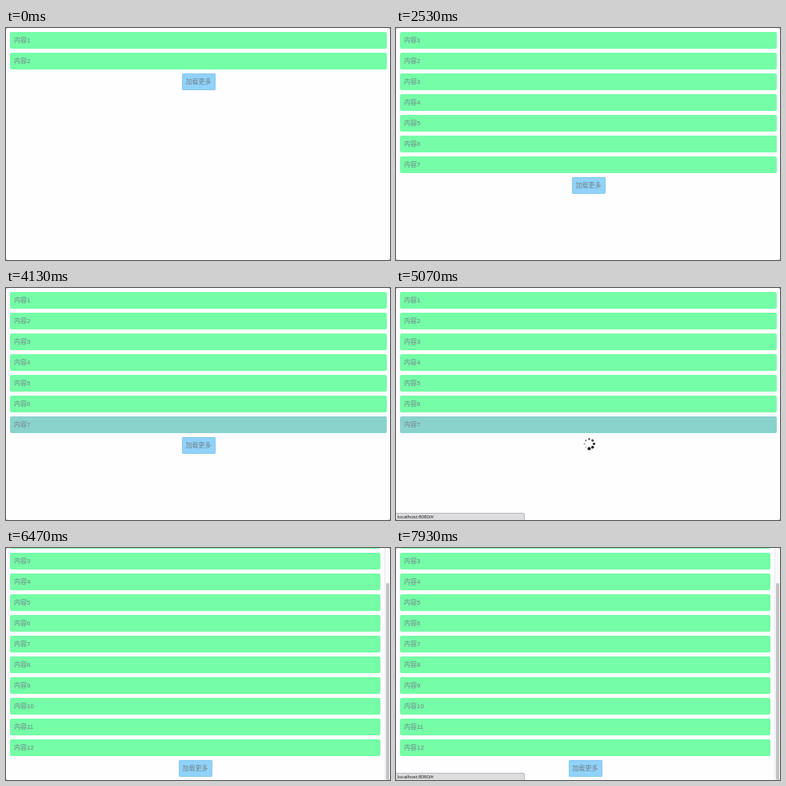
These frames come from a looping animation (480x291 px, 8 s). An HTML page:

```html
<!DOCTYPE html>
<html lang="zh-CN">
<head>
<meta charset="utf-8">
<title>加载更多</title>
<style>
  html, body { margin: 0; width: 100%; height: 100%; overflow: hidden; background: #77757b; }
  #stage {
    position: relative; width: 480px; height: 291px; overflow: hidden;
    background: #fefdff; border-radius: 2px;
    font: 8px/21px "Liberation Sans", "Noto Sans CJK SC", "Noto Sans CJK", sans-serif;
    color: #73808c;
  }
  #page { position: absolute; left: 5px; top: 0; width: 471px; }
  .wide #page { width: 463px; }
  .item, #more {
    position: absolute; height: 21px; box-sizing: border-box;
    border-radius: 2px; white-space: nowrap;
  }
  .item { left: 0; right: 0; padding-left: 5px; background: #75fda7; }
  .item.hover { background: #8ad3cc; }
  #more {
    left: calc(50% - 21px); width: 42px; text-align: center;
    background: #90d2f8; box-shadow: inset 0 0 0 .5px #7fc0e6;
  }
  #spin { position: absolute; left: calc(50% - 8px); width: 17px; height: 17px; }
  #bar {
    position: absolute; right: 0; top: 0; width: 6px; height: 291px;
    background: #faf9fb; border-left: 1px solid #e9e8ea;
  }
  #thumb {
    position: absolute; left: 1px; width: 4px; height: 247px;
    border-radius: 2px; background: #c1c0c2;
  }
  #status {
    position: absolute; left: -1px; bottom: -1px; width: 160px; height: 8px;
    border: 1px solid #b9b8ba; border-top-right-radius: 2px; background: #dddcde;
    color: #222; font-size: 6.2px; line-height: 8px; text-indent: 2px;
  }
  [hidden] { display: none; }
</style>
</head>
<body>
<div id="stage">
  <div id="page">
    <div id="more">加载更多</div>
    <svg id="spin" viewBox="-8.5 -8.5 17 17"></svg>
  </div>
  <div id="bar"><div id="thumb"></div></div>
  <div id="status">localhost:8080/#</div>
</div>
<script>
(() => {
  const LOOP = 8000, PITCH = 26, VIEW = 291, CONTENT = 342;
  const TURN = 660, DOTS = 8;
  const el = id => document.getElementById(id);
  const stage = el('stage'), page = el('page'), more = el('more'), spin = el('spin');
  const bar = el('bar'), thumb = el('thumb'), link = el('status');

  // [start, end) in ms
  const LOADING = [[1460, 2460], [4790, 5860]];
  const LINK = [[1460, 2120], [4320, 5390], [7720, LOOP]];
  // [start, item under the pointer]; 0 means none
  const HOVER = [[0, 0], [2790, 3], [2930, 4], [3060, 5], [3190, 6], [3330, 7], [5390, 0],
    [6920, 10], [7120, 11], [7320, 12], [7660, 0]];

  const rowTop = n => 5 + PITCH * n;
  const within = (spans, t) => spans.some(([a, b]) => t >= a && t < b);

  const items = Array.from({ length: 12 }, (_, i) => {
    const d = document.createElement('div');
    d.className = 'item';
    d.textContent = '内容' + (i + 1);
    d.style.top = rowTop(i) + 'px';
    page.append(d);
    return d;
  });

  const dots = Array.from({ length: DOTS }, (_, i) => {
    const c = document.createElementNS('http://www.w3.org/2000/svg', 'circle');
    const a = i / DOTS * 2 * Math.PI;
    c.setAttribute('cx', 6 * Math.sin(a));
    c.setAttribute('cy', -6 * Math.cos(a));
    spin.append(c);
    return c;
  });

  function drawSpin(t) {
    const head = (t - 5070) / TURN * DOTS + 4.3;
    dots.forEach((c, i) => {
      const lag = (((head - i) % DOTS) + DOTS) % DOTS;
      c.setAttribute('r', 2.05 - lag * 0.19);
      c.setAttribute('opacity', 1 - lag * 0.07);
    });
  }

  function scrollAt(t) {
    const k = Math.min(1, Math.max(0, (t - 5980) / 430));
    return (CONTENT - VIEW) * k * k * (3 - 2 * k);
  }

  function draw(t) {
    const count = t < 2460 ? 2 : t < 5860 ? 7 : 12;
    const busy = within(LOADING, t);
    const hover = HOVER.filter(h => h[0] <= t).pop()[1];
    const scroll = Math.round(scrollAt(t));

    items.forEach((d, i) => {
      d.hidden = i >= count;
      d.classList.toggle('hover', i + 1 === hover);
    });
    more.hidden = busy;
    spin.style.display = busy ? 'block' : 'none';
    more.style.top = rowTop(count) + 'px';
    spin.style.top = rowTop(count) - 0.5 + 'px';
    if (busy) drawSpin(t);

    stage.classList.toggle('wide', count === 12);
    bar.hidden = count < 12;
    page.style.top = -scroll + 'px';
    thumb.style.top = 1 + scroll * VIEW / CONTENT + 'px';
    link.hidden = !within(LINK, t);
  }

  const start = performance.now();
  function tick() {
    draw((performance.now() - start) % LOOP);
    requestAnimationFrame(tick);
  }
  tick();
})();
</script>
</body>
</html>
```
